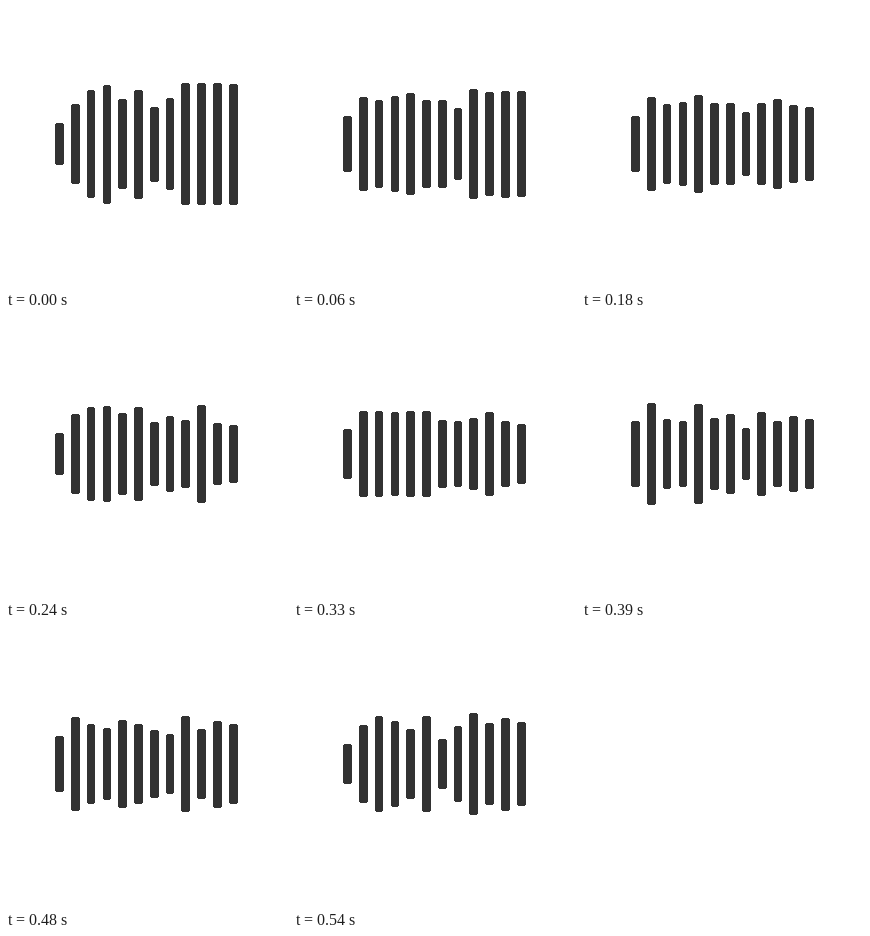
Write an HTML page with a canvas that moves like this. It is 282x282 px and loops after 570 ms.

```html
<!DOCTYPE html>
<html lang="en">
<head>
<meta charset="utf-8">
<title>Sound bars</title>
<style>
  html, body { margin: 0; height: 100%; overflow: hidden; background: #fff; }
  canvas { display: block; }
</style>
</head>
<body>
<canvas id="stage" width="282" height="282"></canvas>
<script>
const ctx = document.getElementById('stage').getContext('2d');
const LOOP = 570, STEP = 30;
const LEFT = 49.14, PITCH = 15.79, WIDTH = 8.77, MIDDLE = 138, MAX_HEIGHT = 122;

// Three shared movements: heights at the key times, linear in between.
const keyTimes = [0, 120, 270, 420, 570];
const dip = [72, 99, 59, 94, 51];
const peak = [115, 72, 100, 60, 97];
const valley = [122, 92, 55, 81, 96];

// Each bar follows one movement, made taller by `offset` and growing by `drift` over the loop.
const bar = (move, offset, drift) => ({ move, offset, drift });
const bars = [
  bar(dip, -24, 12), bar(dip, 13, 10), bar(peak, 0, 14), bar(peak, 0, -8),
  bar(dip, 14, -7), bar(peak, 1, 14), bar(dip, -4, -14), bar(peak, -18, 10),
  bar(valley, 6, 8), bar(peak, 2, -22), bar(valley, 0, 0), bar(valley, -5, -8),
];

function heightAt({ move, offset, drift }, t) {
  const k = keyTimes.findIndex(end => t < end) - 1;
  const p = (t - keyTimes[k]) / (keyTimes[k + 1] - keyTimes[k]);
  const shared = move[k] + (move[k + 1] - move[k]) * p;
  return Math.min(MAX_HEIGHT, shared + offset + drift * (t / LOOP - 0.5));
}

// Whole-pixel bar with its corner pixels cut off.
function drawBar(x, height) {
  const left = Math.round(x), width = Math.round(x + WIDTH) - left;
  const top = Math.round(MIDDLE - height / 2), tall = Math.round(MIDDLE + height / 2) - top;
  ctx.fillRect(left + 1, top, width - 2, tall);
  ctx.fillRect(left, top + 1, width, tall - 2);
}

function draw(t) {
  ctx.clearRect(0, 0, 282, 282);
  ctx.fillStyle = '#323232';
  bars.forEach((b, i) => drawBar(LEFT + i * PITCH, heightAt(b, t)));
}

const start = performance.now();
function frame() {
  const t = (performance.now() - start) % LOOP;
  draw(Math.floor(t / STEP) * STEP);
  requestAnimationFrame(frame);
}
frame();
</script>
</body>
</html>
```
